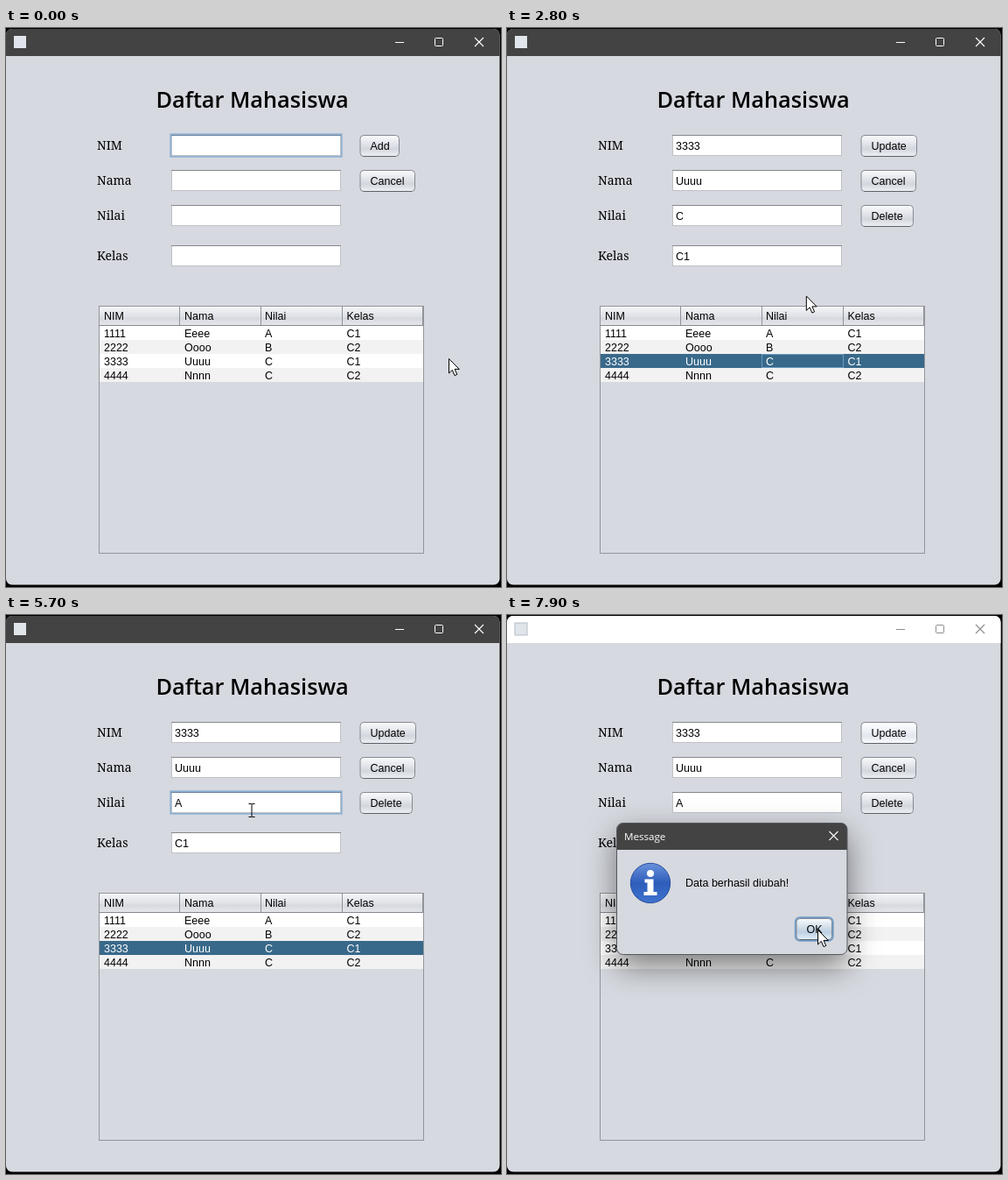
Animation, 566 px wide and 638 px high, one loop 8 s. Source, as an HTML page:

```html
<!DOCTYPE html>
<html lang="id">
<head>
<meta charset="utf-8">
<title>Daftar Mahasiswa</title>
<style>
  html, body { margin: 0; width: 100%; height: 100%; overflow: hidden; background: #000; }
  svg { display: block; width: 100vw; height: 100vh; }
  text { font: 12.5px "Liberation Sans", Arial, sans-serif; white-space: pre; }
  .title { font: 600 25.3px "Open Sans", "Noto Sans", sans-serif; }
  .label { font: 14px "Noto Serif", serif; }
  .bar { font: 11.6px "Open Sans", "Noto Sans", sans-serif; }
  .shadow { filter: drop-shadow(0 13px 17px rgba(0, 0, 0, .5)); }
</style>
</head>
<body>
<svg viewBox="0 0 566 638">
  <defs>
    <linearGradient id="normal" x2="0" y2="1">
      <stop stop-color="#fafbfc"/><stop offset=".5" stop-color="#dcdfe5"/>
      <stop offset=".65" stop-color="#d3d7dd"/><stop offset="1" stop-color="#eef0f4"/>
    </linearGradient>
    <linearGradient id="hover" x2="0" y2="1">
      <stop stop-color="#fff"/><stop offset=".5" stop-color="#eaedf3"/>
      <stop offset=".65" stop-color="#e3e7ee"/><stop offset="1" stop-color="#fbfcff"/>
    </linearGradient>
    <linearGradient id="pressed" x2="0" y2="1">
      <stop stop-color="#8792a2"/><stop offset=".5" stop-color="#9ca6b5"/><stop offset="1" stop-color="#b9c3d1"/>
    </linearGradient>
    <linearGradient id="default" x2="0" y2="1">
      <stop stop-color="#eef3f7"/><stop offset=".5" stop-color="#b6c8d9"/>
      <stop offset=".65" stop-color="#a9bfd3"/><stop offset="1" stop-color="#d3e3f0"/>
    </linearGradient>
    <linearGradient id="defaultHover" x2="0" y2="1">
      <stop stop-color="#f8fbfd"/><stop offset=".5" stop-color="#c9d8e6"/>
      <stop offset=".65" stop-color="#bdd0e1"/><stop offset="1" stop-color="#e3f0fa"/>
    </linearGradient>
    <linearGradient id="head" x2="0" y2="1">
      <stop stop-color="#f4f5f7"/><stop offset=".5" stop-color="#dfe2e7"/>
      <stop offset=".6" stop-color="#d6d9df"/><stop offset="1" stop-color="#e6e8ec"/>
    </linearGradient>
    <linearGradient id="info" x2="0" y2="1">
      <stop stop-color="#6a92dc"/><stop offset=".5" stop-color="#2d5dba"/><stop offset="1" stop-color="#3f74cf"/>
    </linearGradient>
    <clipPath id="window"><rect x="0" y="1" width="564.5" height="634.5" rx="7"/></clipPath>
    <clipPath id="dialog"><rect x="126" y="237.5" width="263" height="150" rx="7"/></clipPath>
  </defs>
  <g id="stage"></g>
</svg>
<script>
const LOOP = 8000, STEP = 100;
const FILL = 2500, EDIT = 4400, ERASE = 4700, TYPE = 5200, PRESS = 6600, DIALOG = 6800;
const FIELD_Y = { NIM: 122, Nama: 162, Nilai: 202, Kelas: 248 };
const COLUMNS = [112, 204, 296, 389.5];
const ROWS = [
  ['1111', 'Eeee', 'A', 'C1'],
  ['2222', 'Oooo', 'B', 'C2'],
  ['3333', 'Uuuu', 'C', 'C1'],
  ['4444', 'Nnnn', 'C', 'C2'],
];
// Pointer moves: begin, end, x, y, sag of the path
const START = [506.5, 377.5];
const MOVES = [
  [1300, 2000, 301.5, 383.5, 18],
  [2500, 3300, 430.5, 138.5, 0],
  [3300, 3400, 384.5, 162.5, 0],
  [3400, 4200, 281, 223, 0],
  [5700, 6300, 441, 133.5, 0],
  [7300, 7900, 355.5, 359.5, 0],
];

const rect = (x, y, w, h, fill, more = '') =>
  `<rect x="${x}" y="${y}" width="${w}" height="${h}" fill="${fill}" ${more}/>`;
const path = (d, stroke, more = '') => `<path d="${d}" fill="none" stroke="${stroke}" ${more}/>`;
const text = (x, y, s, cls = '', fill = '#000') =>
  `<text x="${x}" y="${y}" class="${cls}" fill="${fill}">${s}</text>`;
const cross = (x, y, color) => path(`M${x} ${y}l10 10m0 -10l-10 10`, color, 'stroke-width="1.1"');

function pointerAt(t) {
  let [x, y] = START;
  for (const [begin, end, toX, toY, sag] of MOVES) {
    const u = Math.min(1, Math.max(0, (t - begin) / (end - begin)));
    const p = u * u * (3 - 2 * u);
    x += (toX - x) * p;
    y += (toY - y) * p + sag * Math.sin(Math.PI * p);
  }
  return [x, y];
}

function pointer(x, y, t) {
  const overField = t < DIALOG && x > 190 && x < 383 &&
    Object.values(FIELD_Y).some(top => y > top && y < top + 24);
  if (overField) {
    return path(`M${x - 3.5} ${y - 7.5}h3l.5 .5l.5 -.5h3m-3.5 .5v14m-3.5 .5h3l.5 -.5l.5 .5h3`, '#000');
  }
  return `<path d="M${x} ${y}v16.5l3.8 -3.6l2.7 6.2l2.8 -1.2l-2.7 -6h5.2z" fill="#fff" stroke="#000"/>`;
}

function field(y, value, focused, caret) {
  let s = focused ? rect(188.5, y - .5, 195, 25, 'none', 'stroke="#8fb2d4" stroke-width="2.4"') : '';
  s += rect(189.5, y + .5, 193, 23, '#fff', 'stroke="#bfc1c5"');
  s += path(`M189 ${y + .5}h194`, focused ? '#6d8199' : '#86888c');
  s += text(193, y + 16.7, value);
  if (caret !== null) s += path(`M${caret} ${y + 4}v16`, '#000');
  return s;
}

function button(x, y, w, label, look = 'normal', focused = false) {
  let s = focused ? rect(x - .7, y - .7, w + 1.4, 26.4, 'none', 'rx="5" stroke="#6f9cc6" stroke-width="2"') : '';
  s += rect(x + .5, y + .5, w - 1, 24, `url(#${look})`,
    `rx="4" stroke="${look === 'pressed' ? '#2f3947' : '#858992'}"`);
  s += path(`M${x + 4} ${y + 24.5}h${w - 8}`, '#5d626c');
  return s + text(x + 12, y + 17, label);
}

function frameBar(active) {
  const ink = active ? '#fff' : '#8c8c8c';
  return rect(0, 0, 566, 32, active ? '#434343' : '#fff') +
    rect(9, 9, 14, 14, '#dfe5ea', active ? '' : 'stroke="#b5bcc4"') +
    path('M445 16.5h10', ink) +
    rect(490.5, 11.5, 9, 9, 'none', `rx="1" stroke="${ink}"`) +
    cross(536, 11, ink);
}

function table(t) {
  let s = rect(107, 318, 370, 22, 'url(#head)');
  Object.keys(FIELD_Y).forEach((name, i) => s += text(COLUMNS[i], 333, name));
  for (const x of [198.5, 291.5, 384.5, 476.5]) s += path(`M${x} 318v21`, '#8f9299');
  s += path('M107 339.5h370', '#85888f');
  ROWS.forEach((row, i) => {
    const y = 340 + 16 * i;
    const selected = i === 2 && t >= 2200 && t < DIALOG;
    s += rect(107, y, 370, 16, selected ? '#39698a' : i % 2 ? '#f2f2f2' : '#fff');
    if (selected && t < EDIT) s += rect(291.5, y + .5, 93, 15, 'none', 'stroke="#6b9ac4"');
    row.forEach((cell, c) => {
      const value = i === 2 && c === 2 && t >= DIALOG ? 'A' : cell;
      s += text(COLUMNS[c], y + 13.2, value, '', selected ? '#fff' : '#000');
    });
  });
  return s + rect(106.5, 317.5, 371, 282, 'none', 'stroke="#92959b"');
}

function form(t, x, y) {
  const filled = t >= FILL;
  const grade = t < ERASE ? 'C' : t < TYPE ? '' : 'A';
  const values = filled ? ['3333', 'Uuuu', grade, 'C1'] : ['', '', '', ''];
  const focus = t < 2200 ? 0 : t >= EDIT && t < PRESS ? 2 : -1;
  const lastKey = t < ERASE ? EDIT : t < TYPE ? ERASE : TYPE;
  const caretOn = focus === 0
    ? Math.floor((t + 100) / 500) % 2 === 1
    : Math.floor((t - lastKey) / 500) % 2 === 0;
  const caretX = focus === 0 || !grade ? 193.5 : grade === 'C' ? 202.5 : 201.5;

  let s = text(171.5, 91, 'Daftar Mahasiswa', 'title');
  Object.entries(FIELD_Y).forEach(([name, top], i) => {
    s += text(104, top + 17, name, 'label');
    s += field(top, values[i], focus === i, focus === i && caretOn ? caretX : null);
  });

  const pressed = t >= PRESS && t < DIALOG;
  const over = x > 405 && x < 469 && y > 122 && y < 147;
  const look = pressed ? 'pressed' : over || t >= DIALOG ? 'hover' : 'normal';
  s += filled ? button(404.5, 122, 64.5, 'Update', look, pressed) : button(404.5, 122, 45.5, 'Add');
  s += button(404.5, 162, 63.5, 'Cancel');
  if (filled) s += button(404.5, 202, 60.5, 'Delete');
  return s;
}

function dialog(x, y) {
  const over = x > 331 && x < 372 && y > 346 && y < 371;
  return rect(126, 237.5, 263, 150, '#d6d9df', 'rx="7" class="shadow"') +
    `<g clip-path="url(#dialog)">${rect(126, 237, 264, 31, '#434343')}</g>` +
    rect(125.5, 237.5, 263.5, 150, 'none', 'rx="7" stroke="#55585d"') +
    text(134, 257, 'Message', 'bar', '#fff') + cross(368.5, 247, '#fff') +
    '<circle cx="164" cy="306" r="22.7" fill="url(#info)" stroke="#2a4f9c"/>' +
    '<circle cx="164" cy="295" r="4" fill="#fff"/>' +
    '<path d="M157.5 301.5h10v14.5h4v4h-15v-4h4v-10.5h-3z" fill="#fff"/>' +
    text(204, 310.3, 'Data berhasil diubah!') +
    button(330.5, 346, 41.5, 'OK', over ? 'defaultHover' : 'default', true);
}

function draw(t) {
  const [x, y] = pointerAt(t);
  const open = t >= DIALOG;
  document.getElementById('stage').innerHTML =
    rect(0, 0, 566, 638, '#000') +
    `<g clip-path="url(#window)">${rect(0, 0, 566, 638, '#d6d9df')}${frameBar(!open)}` +
    form(t, x, y) + table(t) + (open ? dialog(x, y) : '') + '</g>' +
    pointer(x, y, t);
}

let shown = -1;
function tick(now) {
  const t = Math.floor((now % LOOP) / STEP) * STEP;
  if (t !== shown) draw(shown = t);
  requestAnimationFrame(tick);
}
draw(0);
requestAnimationFrame(tick);
</script>
</body>
</html>
```
